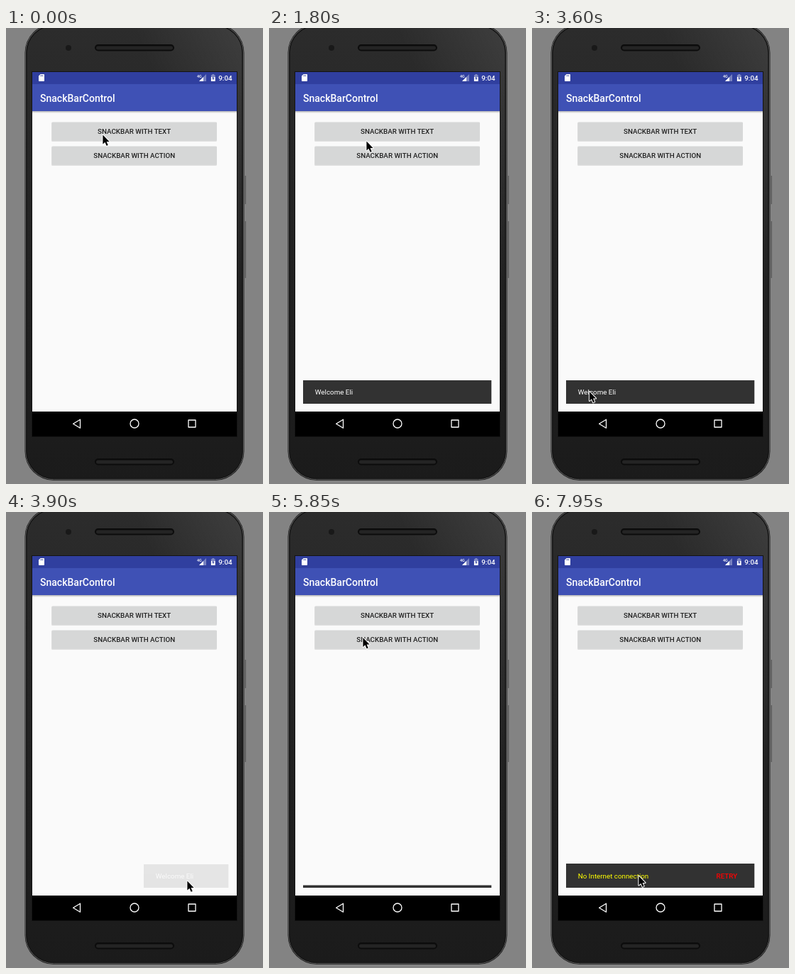
An HTML page for the animation above (8000 ms loop, 362 by 642 pixels).

```html
<!DOCTYPE html>
<html lang="en">
<head>
<meta charset="utf-8">
<title>Snackbar demo</title>
<style>
  html, body { margin: 0; width: 100%; height: 100%; overflow: hidden; background: #838383; }
  svg { display: block; width: 362px; height: 642px; }
  text { font-family: Roboto, "Noto Sans", sans-serif; font-size: 9.8px; }
  .medium { font-weight: 500; }
</style>
</head>
<body>
<svg viewBox="0 0 362 642">
  <defs>
    <linearGradient id="shell" x1="0" y1="0" x2="0" y2="1">
      <stop offset="0" stop-color="#2c2c2c"/>
      <stop offset=".5" stop-color="#222"/>
      <stop offset="1" stop-color="#1b1b1b"/>
    </linearGradient>
    <linearGradient id="sheen" gradientUnits="userSpaceOnUse" x1="200" y1="50" x2="320" y2="0">
      <stop offset="0" stop-color="#fff" stop-opacity="0"/>
      <stop offset="1" stop-color="#fff" stop-opacity=".08"/>
    </linearGradient>
    <linearGradient id="shade" x1="0" y1="0" x2="0" y2="1">
      <stop offset="0" stop-color="#000" stop-opacity=".28"/>
      <stop offset="1" stop-color="#000" stop-opacity="0"/>
    </linearGradient>
    <clipPath id="dock"><rect x="48" y="495" width="265.3" height="34"/></clipPath>
    <g id="speaker">
      <rect x="125" y="-5" width="112" height="9.5" rx="4.7" fill="#0c0c0c"/>
      <rect x="127" y="-2.5" width="108" height="5" rx="2.5" fill="#242424"/>
    </g>
    <g id="button">
      <rect x="64" y=".6" width="233" height="27" rx="1.6" fill="#000" opacity=".1"/>
      <rect x="64.5" width="232.5" height="26.4" rx="1.4" fill="#d6d7d7"/>
    </g>
  </defs>

  <!-- phone shell -->
  <rect width="362" height="642" fill="#838383"/>
  <path d="M337.3 208V248M337.3 272V352" stroke="#4c4c4c"/>
  <rect x="26.5" y="-6" width="309" height="643" rx="41" fill="#1a1a1a"/>
  <rect x="27.6" y="-4.9" width="306.8" height="640.6" rx="40" fill="url(#shell)" stroke="#707070" stroke-width=".8"/>
  <rect x="29" y="-3.5" width="304" height="637.8" rx="38.5" fill="url(#sheen)" stroke="#161616" stroke-width="1.4"/>
  <circle cx="88" cy="28" r="4" fill="#191919"/>
  <use href="#speaker" y="28"/>
  <use href="#speaker" y="611"/>

  <!-- screen -->
  <rect x="36" y="61" width="290" height="515" fill="#141414"/>
  <rect x="37" y="117" width="288" height="423" fill="#fafafa"/>
  <rect x="37" y="62" width="288" height="17" fill="#303f9f"/>
  <rect x="37" y="79" width="288" height="38" fill="#3f51b5"/>
  <rect x="37" y="117" width="288" height="3" fill="url(#shade)"/>
  <rect x="37" y="540" width="288" height="35" fill="#000"/>

  <!-- status icons -->
  <path d="M48.6 65H53.2Q54 65 54 65.8V74.2Q54 75 53.2 75H46.8Q46 75 46 74.2V67.6Z" fill="#fff"/>
  <path d="M48.9 66.2V68.2M50.4 66.2V68.2M51.9 66.2V68.2" stroke="#303f9f" stroke-width=".7"/>
  <path d="M282 65V75H272Z" fill="#fff" opacity=".35"/>
  <path d="M278 69V75H272Z" fill="#fff"/>
  <text class="medium" x="269" y="70" fill="#fff" style="font-size:5.4px">4G</text>
  <path d="M290 66.2H288.9V75H294.6V66.2H293.2V65H290.4V66.2Z" fill="#fff" opacity=".4"/>
  <path d="M288.9 69H294.6V75H288.9Z" fill="#fff"/>
  <path d="M292.2 67.4L290.2 71.2H291.5V74L293.4 70.3H292.2Z" fill="#303f9f"/>
  <text class="medium" x="299.3" y="74" fill="#fff">9:04</text>

  <text class="medium" x="48" y="104" fill="#fff" style="font-size:14px">SnackBarControl</text>

  <use href="#button" y="132.4"/>
  <use href="#button" y="166.4"/>
  <g class="medium" fill="#212121" text-anchor="middle">
    <text x="180.7" y="149">SNACKBAR WITH TEXT</text>
    <text x="180.7" y="183">SNACKBAR WITH ACTION</text>
  </g>

  <g fill="none" stroke="#fff" stroke-width="1.3" stroke-linejoin="round">
    <path d="M104.5 551.2V563.2L94.6 557.2Z"/>
    <circle cx="181" cy="557" r="6"/>
    <rect x="257" y="552" width="10" height="10"/>
  </g>

  <!-- snackbars -->
  <g clip-path="url(#dock)">
    <g id="welcome">
      <rect x="48" y="496" width="266" height="33" fill="#323232"/>
      <text x="64.8" y="516.2" fill="#fff">Welcome Eli</text>
    </g>
    <g id="offline">
      <rect x="48" y="495" width="266" height="34" fill="#323232"/>
      <g>
        <text x="64.8" y="515.8" fill="#ff0">No Internet connection</text>
        <text class="medium" x="259.6" y="515.8" fill="#f00">RETRY</text>
      </g>
    </g>
  </g>

  <path id="cursor" d="M.4 1V14L3.4 11.2L5.6 16.3L7.7 15.4L5.6 10.4H9.6Z"
        fill="#000" stroke="#fff" stroke-width="2" stroke-linejoin="round" paint-order="stroke"/>
</svg>

<script>
const LOOP = 8000, TICK = 150, BAR_WIDTH = 266;
const SWIPE = 3600, GONE = 4050;
const $ = s => document.querySelector(s);
const cursor = $('#cursor'), welcome = $('#welcome'), offline = $('#offline');
const clamp = v => Math.max(0, Math.min(1, v));
const smooth = p => p * p * (3 - 2 * p);

// pointer moves; it rests between them
const home = { x: 136, y: 149.5 };
const moves = [
  { from: 0, to: 450, x: 134, y: 143.5 },
  { from: 900, to: 1800, x: 137, y: 158.5 },
  { from: 2250, to: 3150, x: 76, y: 520 },
  { from: 3150, to: SWIPE, x: 80.5, y: 511 },
  { from: SWIPE, to: 3900, x: 255, y: 518.5 },
  { from: 3900, to: GONE, x: 292, y: 539 },
  { from: 4500, to: 5100, x: 144.5, y: 198.5 },
  { from: 5100, to: 5550, x: 132, y: 176 },
  { from: 6300, to: 6600, x: 110, y: 411.5 },
  { from: 6600, to: 7200, x: 216, y: 525 },
  { from: 7200, to: 7950, x: 150, y: 511.5 }
];

function tipAt(t) {
  let { x, y } = home;
  for (const m of moves) {
    const k = smooth(clamp((t - m.from) / (m.to - m.from)));
    x += (m.x - x) * k;
    y += (m.y - y) * k;
  }
  return { x, y };
}

// slide up for 250 ms while the label fades in
function enter(bar, age) {
  bar.style.display = age < 0 ? 'none' : '';
  bar.lastElementChild.setAttribute('opacity', clamp((age - 70) / 180));
  return 34 * (1 - smooth(clamp(age / 250)));
}

function draw(time) {
  const t = Math.floor(time / TICK) * TICK;
  const { x, y } = tipAt(t);
  cursor.setAttribute('transform', `translate(${x} ${y})`);

  // the first bar follows the drag and fades with distance
  const drag = t > SWIPE && t < GONE ? Math.max(0, x - 109) : 0;
  const rise = enter(welcome, t < GONE ? t - 400 : -1);
  welcome.setAttribute('transform', `translate(${drag} ${rise})`);
  welcome.setAttribute('opacity', clamp(1 - (drag / BAR_WIDTH - 0.1) / 0.5));

  offline.setAttribute('transform', `translate(0 ${enter(offline, t - 5800)})`);
}

const start = performance.now();
function loop() {
  draw((performance.now() - start) % LOOP);
  requestAnimationFrame(loop);
}
loop();
</script>
</body>
</html>
```
